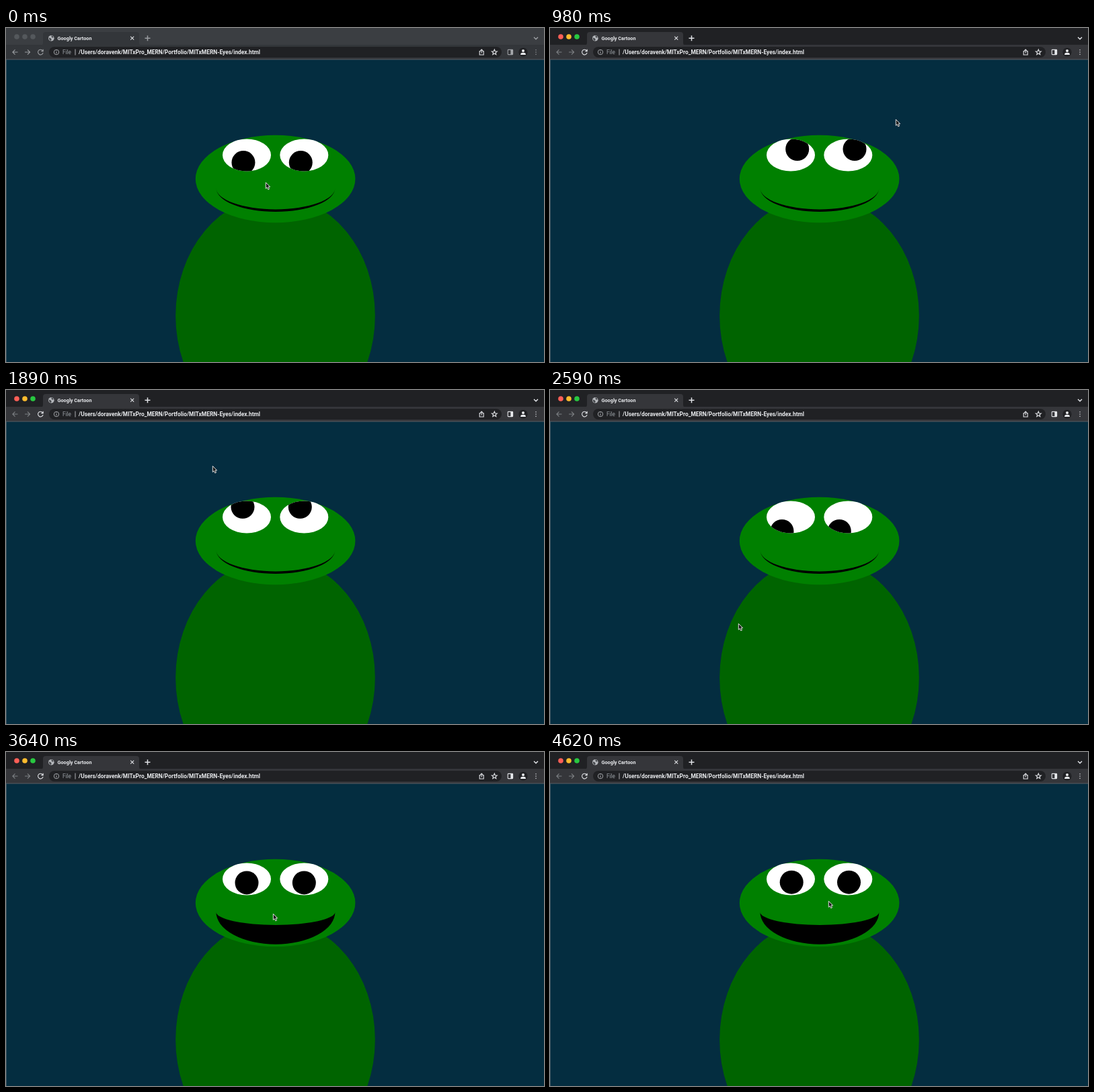
Write an HTML page that moves like this. It is 800 px wide and 498 px high and loops after 4690 ms.

```html
<!DOCTYPE html>
<html lang="en">
<head>
<meta charset="utf-8">
<title>Googly Cartoon</title>
<style>
  html, body { margin: 0; width: 100%; height: 100%; overflow: hidden; background: #000; }
  svg { display: block; width: 800px; height: 498px; font-family: Roboto, "Liberation Sans", sans-serif; }
  .strip { fill: #202124; }
  .panel { fill: #35363a; }
  .line { fill: none; stroke: #dfe1e5; stroke-width: 1.1; }
  .thick { stroke-width: 1.5; }
  .solid { fill: #e8eaed; }
  .dim { stroke: #7d8084; }
  .idle .strip { fill: #3b3e42; }
  .idle .panel { fill: #33363a; }
  .idle .light { fill: #54585c; }
  .idle .line:not(.keep) { stroke: #9a9da1; }
  .idle .solid:not(.keep) { fill: #a5a8ac; }
</style>
</head>
<body>
<svg viewBox="0 0 800 498">
  <defs>
    <clipPath id="sockets">
      <ellipse cx="358" cy="189.5" rx="36" ry="24"/>
      <ellipse cx="443.3" cy="189.5" rx="36" ry="24"/>
    </clipPath>
  </defs>

  <rect y="46" width="800" height="452" fill="#042d40"/>
  <ellipse cx="400.5" cy="429" rx="148.3" ry="179" fill="#006400"/>
  <ellipse cx="400.6" cy="225" rx="118.8" ry="65.3" fill="#008000"/>
  <g clip-path="url(#sockets)">
    <rect x="320" y="164" width="162" height="52" fill="#fff"/>
    <g id="pupils">
      <circle r="17.5"/>
      <circle cx="85.3" r="17.5"/>
    </g>
  </g>
  <path id="mouth"/>

  <g id="chrome">
    <rect class="strip" width="800" height="26"/>
    <path class="panel" d="M51 26q4 0 4-4V10q0-4 4-4h135q4 0 4 4v12q0 4 4 4z"/>
    <rect class="panel" y="25" width="800" height="22"/>
    <rect y="46.4" width="800" height="1" fill="#5b5e62"/>
    <rect x="64" y="28" width="673" height="16" rx="8" fill="#202124"/>
    <g id="lights"></g>

    <circle cx="67.3" cy="15.2" r="4.3" fill="#b4b7bb"/>
    <path d="M63.8 14.2l3 1.2 1 2-1.4 1.6q-2.6-1-2.6-4.8zm3.2-2.6l2.6.3 1 2-2 .8z" fill="#44474b"/>
    <text class="solid keep" x="76.5" y="18" font-size="7.3" font-weight="600">Googly Cartoon</text>
    <path class="line keep" d="M185.2 12.7l5 5m0-5l-5 5"/>
    <path class="line thick" d="M206.5 15.2h8m-4-4v8M785 13.7l3 3 3-3"/>

    <path class="line dim" d="M17.5 36h-7.6m3.6-3.6L9.9 36l3.6 3.6"/>
    <path class="line dim" d="M28 36h7.6M32 32.4l3.6 3.6-3.6 3.6"/>
    <path class="line" d="M54.6 34a3.8 3.8 0 1 0 .5 2.8M55.2 31.8v2.8h-2.8"/>
    <g fill="none" stroke="#aeb1b5">
      <circle cx="75" cy="36" r="3.7" stroke-width=".9"/>
      <path d="M75 35.4v2.6M75 33.5v.9M103 31.5v9"/>
    </g>
    <text x="84" y="39" font-size="8.3" fill="#9aa0a6">File</text>
    <text class="solid keep" x="108" y="39" font-size="8.4" font-weight="700">/Users/doravenk/MITxPro_MERN/Portfolio/MITxMERN-Eyes/index.html</text>

    <path class="line keep" d="M705.8 34.6h-1.6v5.4h6v-5.4h-1.6M707.2 37.5v-5.4m-1.9 1.8l1.9-1.9 1.9 1.9"/>
    <path id="star" class="line keep"/>
    <rect class="line" x="746.2" y="32.4" width="7.4" height="7.2" rx=".8"/>
    <rect class="solid" x="750.4" y="32.4" width="3.4" height="7.2"/>
    <circle cx="769" cy="36" r="6.6" fill="#202124"/>
    <circle class="solid keep" cx="769" cy="34" r="2"/>
    <path class="solid keep" d="M765.2 40v-1q0-2.3 3.8-2.3t3.8 2.3v1z"/>
    <path class="line thick" stroke-linecap="round" stroke-dasharray="0 3.3" d="M788 32.7v6.7"/>
  </g>

  <path d="M.5 47V498" stroke="#3d5563"/>
  <path id="cursor" d="M.3 .3v9.1l2-1.8 1.5 3.3 1.7-.8-1.5-3.2h2.7z" fill="#1c1c1c" stroke="#ddd" stroke-linejoin="round"/>
</svg>
<script>
const LOOP = 4690, STEP = 70, FOCUS = 210, FADE = 4;
const $ = id => document.getElementById(id);

// Turning points of the pointer: time, x, y
const path = [
  [-70, 344, 269], [0, 386, 230], [420, 400, 220], [980, 514, 136],
  [1540, 446, 111], [1890, 307, 113], [2240, 224, 225], [2590, 280, 348],
  [2940, 515, 352], [3220, 447, 323], [3570, 400, 234], [4130, 399, 353],
  [4620, 414, 222]
];

function slope(i, axis) {
  const a = path[i - 1], b = path[i + 1];
  return a && b ? (b[axis] - a[axis]) / (b[0] - a[0]) : 0;
}

// Smooth curve through the turning points
function pointerAt(time) {
  const t = Math.max(time, path[0][0]);
  const last = path.length - 1;
  let i = 0;
  while (i < last - 1 && path[i + 1][0] <= t) i++;
  const a = path[i], b = path[i + 1], span = b[0] - a[0];
  const k = Math.min((t - a[0]) / span, 1);
  const s = k * k * (3 - 2 * k);
  return [1, 2].map(axis =>
    a[axis] + (b[axis] - a[axis]) * s
    + span * k * (1 - k) * ((1 - k) * slope(i, axis) - k * slope(i + 1, axis)));
}

function overHead(t) {
  const [x, y] = pointerAt(t);
  return t >= FOCUS && Math.hypot((x - 400.6) / 118.8, (y - 225) / 65.3) < 1;
}

// The mouth opens while the pointer rests on the head.
function openness(t) {
  let hits = 0;
  for (let i = 0; i < FADE; i++) hits += overHead(t - i * STEP);
  const k = hits / FADE;
  return k * k * (3 - 2 * k);
}

function place(el, x, y) {
  el.setAttribute("transform", `translate(${x} ${y})`);
}

function starPath(cx, cy) {
  let d = "";
  for (let i = 0; i < 10; i++) {
    const r = i % 2 ? 1.8 : 4.2, a = i * Math.PI / 5 - Math.PI / 2;
    d += `${i ? "L" : "M"}${cx + r * Math.cos(a)} ${cy + r * Math.sin(a)}`;
  }
  return d + "z";
}

function draw(t) {
  const [x, y] = pointerAt(t);
  place($("cursor"), x, y);

  // The eyes follow one step behind the pointer.
  const [ex, ey] = pointerAt(t - STEP);
  place($("pupils"), 322 + ex * 0.09, 157.5 + ey * 0.16);

  const open = openness(t);
  const outer = 35.6 + 12.7 * open, inner = 32 - 12.5 * open;
  $("mouth").setAttribute("d",
    `M312.4 238.4A88.5 ${outer} 0 0 0 489.4 238.4A88.5 ${inner} 0 0 1 312.4 238.4z`);

  $("chrome").classList.toggle("idle", t < FOCUS);
}

$("star").setAttribute("d", starPath(726.3, 36.2));
$("lights").innerHTML = ["#ff5f57", "#febc2e", "#28c840"]
  .map((c, i) => `<circle class="light" cx="${16 + 12 * i}" cy="13" r="3.8" fill="${c}"/>`)
  .join("");

const start = performance.now();
function tick() {
  const t = (performance.now() - start) % LOOP;
  draw(Math.floor(t / STEP) * STEP);
  requestAnimationFrame(tick);
}
tick();
</script>
</body>
</html>
```
